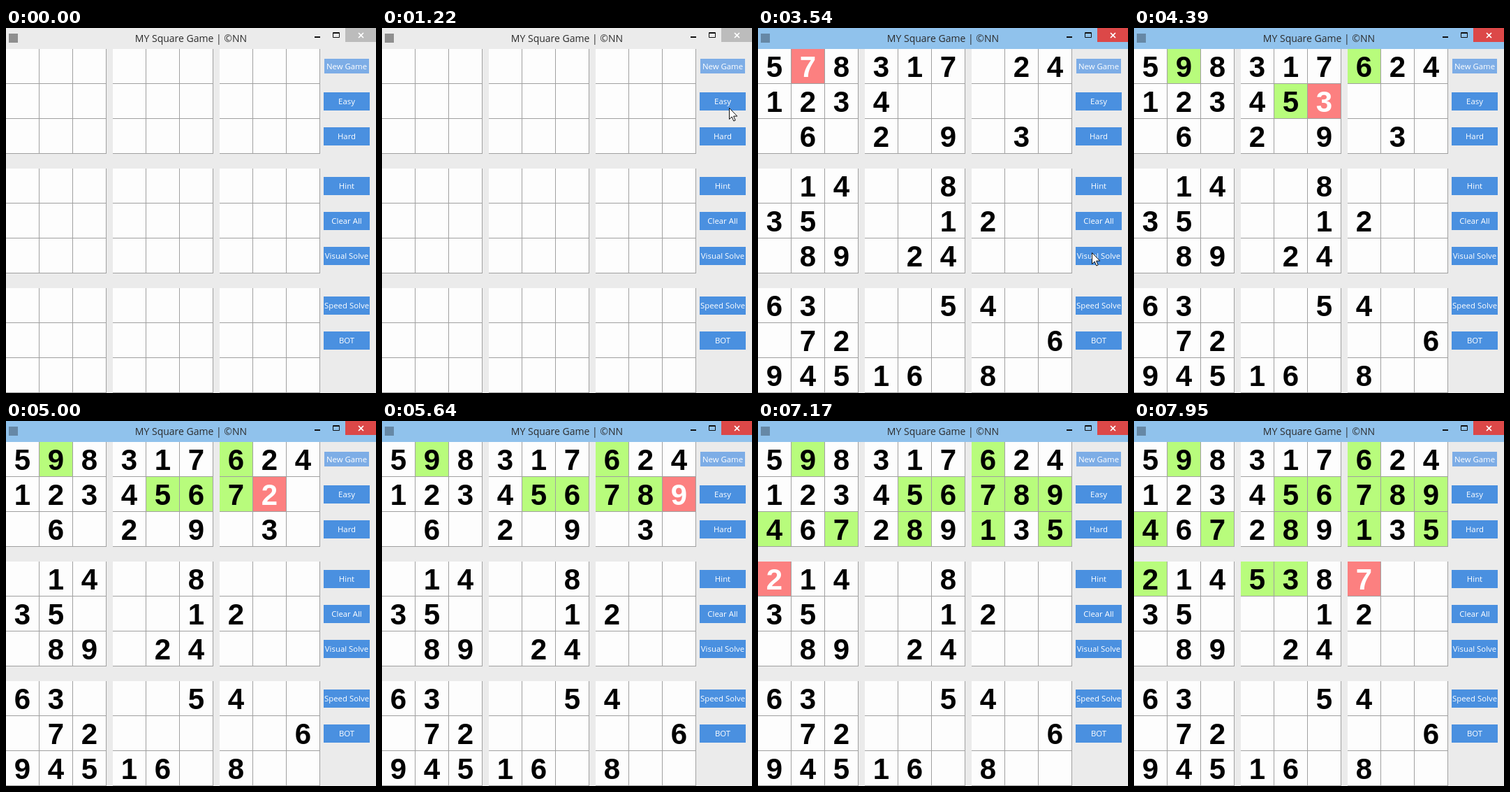
Recreate the animation shown at these times as an HTML page. Size 530 px wide and 522 px high, loop 7990 ms.

```html
<!DOCTYPE html>
<html lang="en">
<head>
<meta charset="utf-8">
<title>Number puzzle</title>
<style>
  html, body { margin: 0; width: 100%; height: 100%; overflow: hidden; }
  body { position: relative; background: #ebebeb; }
  div, svg { position: absolute; box-sizing: border-box; }
  #bar { left: 0; top: 0; width: 530px; height: 30px; background: #ebebeb;
    font: 14px/29px "Open Sans", sans-serif; color: #2b2b2b; text-align: center; }
  #icon { left: 4px; top: 8px; width: 13px; height: 13px; background: #8f8f8f; }
  #close { left: 486px; top: 0; width: 44px; height: 20px; background: #bcbcbc; }
  #controls { left: 0; top: 0; }
  .active #bar { background: #90c2ec; }
  .active #icon { background: #6688a6; }
  .active #close { background: #dc4848; }
  .cell { width: 48px; height: 50px; background: #fdfdfd; color: #000;
    border: solid #a0a0a0; border-width: 0 1px 1px 0;
    font: bold 42px/51px "Liberation Sans", Arial, sans-serif; text-align: center; }
  .done { background: #b8fc7c; }
  .trying { background: #fc8080; color: #fff; }
  .button { left: 455px; width: 66px; height: 26px; background: #4a90e0; color: #fff;
    font: 11.4px/25px "Open Sans", sans-serif; text-align: center; white-space: nowrap; }
  .new { left: 456px; width: 64px; height: 21px; line-height: 21px; background: #7dade6; }
  #cursor { left: 0; top: 0; }
</style>
</head>
<body>
<div id="bar">MY Square Game | ©NN</div>
<div id="icon"></div>
<div id="close"></div>
<svg id="controls" width="530" height="30" fill="none">
  <path d="M442 13h8" stroke="#111" stroke-width="2"/>
  <path d="M468.5 6.5h9v7h-9zM468 7.5h10" stroke="#111"/>
  <path d="M505 7l7 7m0-7l-7 7" stroke="#fff" stroke-width="1.7"/>
</svg>
<script>
const LOOP = 7990;
const ACTIVATED = 1250;
const PUZZLE =
  "508317024" + "123400000" + "060209030" +
  "014008000" + "350001200" + "089024000" +
  "630005400" + "072000006" + "945160800";

// [time, solver ticks elapsed]
const PACE = [[3289, 0], [3540, 6.5], [4390, 28.5], [5640, 62], [6530, 83.5], [7950, 121.5]];
// [time, x, y]
const POINTER = [
  [250, 540, 415], [1050, 497, 114], [2300, 497, 114],
  [2950, 478, 321], [3650, 478, 321], [4050, 545, 390]
];

const add = (className, left, top, text = "") => {
  const el = document.createElement("div");
  el.className = className;
  if (left !== null) el.style.left = left + "px";
  el.style.top = top + "px";
  el.textContent = text;
  return document.body.appendChild(el);
};

const cells = [...PUZZLE].map((_, i) => {
  const row = Math.floor(i / 9), col = i % 9;
  return add("cell",
    Math.floor(col / 3) * 153 + (col % 3) * 48,
    Math.floor(row / 3) * 171 + (row % 3) * 50 + 30);
});

add("button new", null, 44, "New Game");
[["Easy", 92], ["Hard", 142], ["Hint", 213], ["Clear All", 263],
 ["Visual Solve", 313], ["Speed Solve", 384], ["BOT", 434]]
  .forEach(([label, top]) => add("button", null, top, label));

document.body.insertAdjacentHTML("beforeend",
  `<svg id="cursor" width="14" height="21"><path d="M.5.5v16l3.7-3.5 2.6 6 2.4-1-2.6-5.9h5.2z"
   fill="#fff" stroke="#111"/></svg>`);
const cursor = document.getElementById("cursor");

// One entry per tick: each digit is tried in turn; one that fits is held, then confirmed.
function solverTicks() {
  const board = [...PUZZLE].map(Number), ticks = [];
  const box = i => Math.floor(i / 27) * 3 + Math.floor(i % 9 / 3);
  const fits = (at, digit) => !board.some((d, i) => d === digit &&
    (i % 9 === at % 9 || Math.floor(i / 9) === Math.floor(at / 9) || box(i) === box(at)));
  for (let at = 0; at < 81; at++) {
    if (board[at]) continue;
    for (let digit = 1; digit <= 9; digit++) {
      const attempt = { at, digit, trying: true };
      ticks.push(attempt);
      if (fits(at, digit)) {
        board[at] = digit;
        ticks.push(attempt, { at, digit, trying: false });
        break;
      }
    }
  }
  return ticks;
}
const ticks = solverTicks();

function along(keys, t, ease = p => p) {
  if (t <= keys[0][0]) return keys[0].slice(1);
  for (let i = 1; i < keys.length; i++) {
    const [a, b] = [keys[i - 1], keys[i]];
    if (t < b[0]) {
      const p = ease((t - a[0]) / (b[0] - a[0]));
      return a.slice(1).map((v, k) => v + (b[k + 1] - v) * p);
    }
  }
  return keys[keys.length - 1].slice(1);
}
const smooth = p => p * p * (3 - 2 * p);

function render(t) {
  const active = t >= ACTIVATED;
  document.body.className = active ? "active" : "";

  const count = t < PACE[0][0] ? 0 : Math.floor(along(PACE, t)[0]) + 1;
  const entered = {};
  for (const tick of ticks.slice(0, count)) entered[tick.at] = tick;

  cells.forEach((cell, i) => {
    const entry = entered[i];
    const given = active && PUZZLE[i] !== "0" ? PUZZLE[i] : "";
    const text = entry ? String(entry.digit) : given;
    const className = "cell" + (entry ? (entry.trying ? " trying" : " done") : "");
    if (cell.textContent !== text) cell.textContent = text;
    if (cell.className !== className) cell.className = className;
  });

  const [x, y] = along(POINTER, t, smooth);
  cursor.style.transform = `translate(${Math.round(x)}px, ${Math.round(y)}px)`;
}

const start = performance.now();
function tick() {
  render((performance.now() - start) % LOOP);
  requestAnimationFrame(tick);
}
render(0);
requestAnimationFrame(tick);
</script>
</body>
</html>
```
